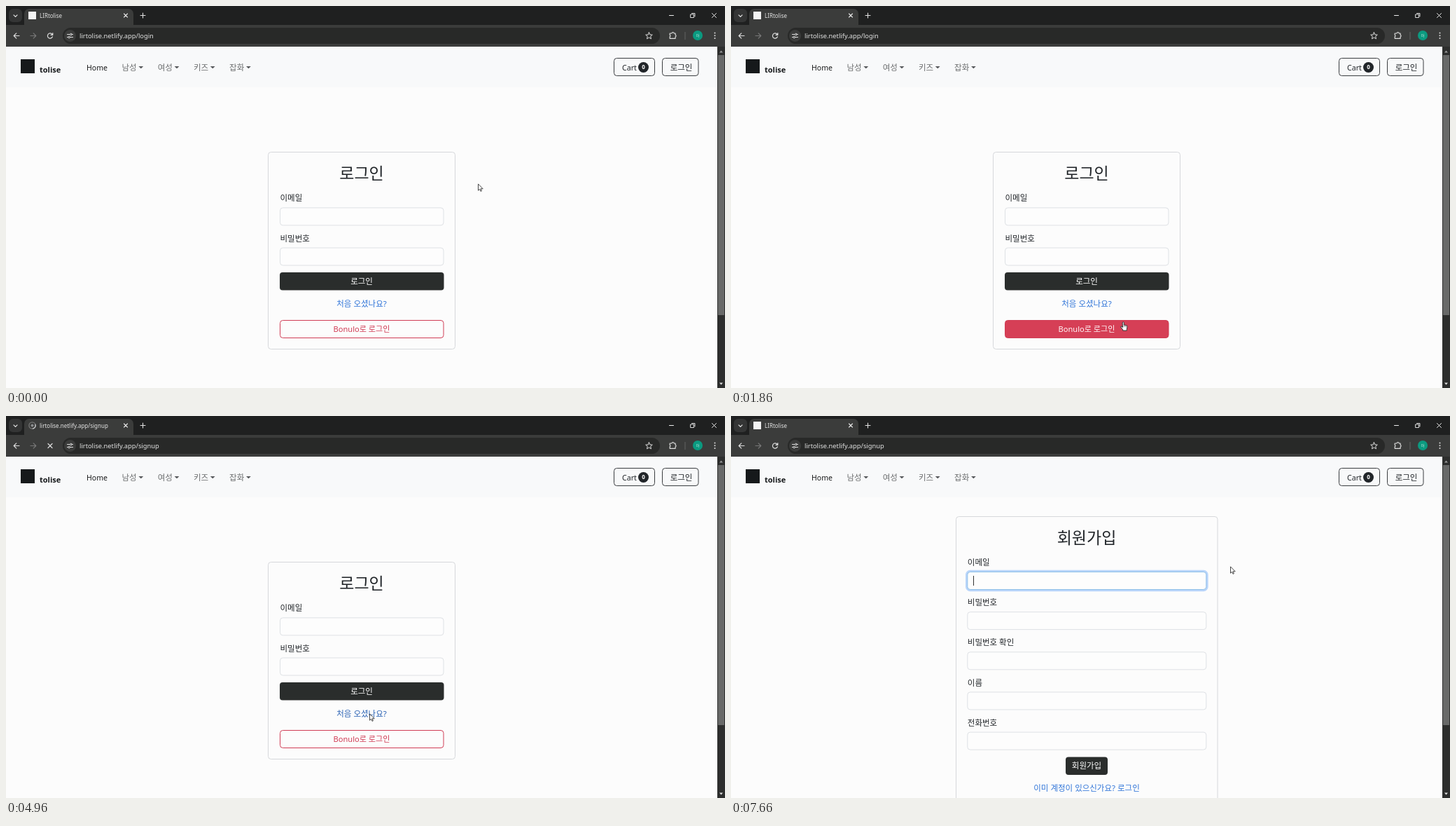
These frames come from a looping animation (1027 by 545 pixels, 8000 ms). An HTML page with a canvas:

```html
<!DOCTYPE html>
<html lang="ko">
<head>
<meta charset="utf-8">
<style>
html, body { margin: 0; width: 100%; height: 100%; overflow: hidden; background: #fcfcfc; }
canvas { display: block; }
</style>
</head>
<body>
<canvas id="stage" width="1027" height="545"></canvas>
<script>
const ctx = document.getElementById('stage').getContext('2d');
const LOOP = 8000;
const INK = '#212529', LINE = '#dee1e5', LINK = '#2f74d8', LINK_HOVER = '#2a62b4', RED = '#d03d55', PAGE = '#fcfcfc';
const FAMILY = '"Noto Sans", "Noto Sans CJK KR", "Noto Sans CJK", sans-serif';
const SITE = 'LIRtolise', HOST = 'lirtolise.netlify.app';

// Pointer stops: time, x, y (hot spot)
const POINTER = [
  [0, 674, 254], [1290, 674, 254], [1365, 612, 449], [1460, 580, 454], [1530, 572, 457],
  [1820, 572, 457], [1890, 552, 446], [2000, 528, 430], [2060, 525, 428], [2195, 525, 428],
  [2300, 521, 425], [3820, 521, 425], [3900, 519, 425],
  [5195, 519, 425], [5430, 506, 366], [5650, 506, 366], [5760, 480, 300],
  [5925, 480, 300], [5965, 470, 280], [6090, 470, 280], [6170, 450, 244],
  [6450, 450, 244], [6630, 693, 226], [6950, 693, 226], [7130, 713, 215], [LOOP, 713, 215]
];

const clamp = v => Math.max(0, Math.min(1, v));
const ramp = (t, start, span = 150) => clamp((t - start) / span);
const between = (t, a, b) => t >= a && t < b;

function pointerAt(t) {
  const i = POINTER.findIndex(p => p[0] > t);
  const a = POINTER[i - 1], b = POINTER[i], k = (t - a[0]) / (b[0] - a[0]);
  return [a[1] + (b[1] - a[1]) * k, a[2] + (b[2] - a[2]) * k];
}

function box(x, y, w, h, r, fill, stroke, width = 1) {
  ctx.beginPath();
  ctx.roundRect(x, y, w, h, r);
  if (fill) { ctx.fillStyle = fill; ctx.fill(); }
  if (stroke) { ctx.strokeStyle = stroke; ctx.lineWidth = width; ctx.stroke(); }
}

function disc(x, y, r, fill) {
  ctx.beginPath();
  ctx.arc(x, y, r, 0, 7);
  ctx.fillStyle = fill;
  ctx.fill();
}

// y is the optical middle of the line
function text(str, x, y, size, color, align = 'left', weight = 400) {
  ctx.font = `${weight} ${size}px ${FAMILY}`;
  ctx.textAlign = align;
  ctx.fillStyle = color;
  ctx.fillText(str, x, y + size * 0.37);
}

function path(d, x, y, stroke, width = 1, fill) {
  const p = new Path2D(d);
  ctx.save();
  ctx.translate(x, y);
  ctx.lineJoin = ctx.lineCap = 'round';
  if (fill) { ctx.fillStyle = fill; ctx.fill(p); }
  if (stroke) { ctx.strokeStyle = stroke; ctx.lineWidth = width; ctx.stroke(p); }
  ctx.restore();
}

const CROSS = 'M-2.5-2.5L2.5 2.5M2.5-2.5L-2.5 2.5';

function drawTabs(t, loading) {
  box(0, 0, 1027, 28, 0, '#1f2020');
  box(4, 4, 19, 19, 6, '#343535');
  path('M-2.5-1.2L0 1.3L2.5-1.2', 13.5, 14, '#e6e6e6', 1.2);
  box(26, 4, 156, 30, 7, '#3b3c3b');
  if (between(t, 4360, 5200)) {
    const turn = t / 160;
    ctx.lineWidth = 1.3;
    ctx.strokeStyle = '#777';
    ctx.beginPath(); ctx.arc(37.5, 13.5, 4.6, 0, 7); ctx.stroke();
    ctx.strokeStyle = '#c4c6c8';
    ctx.beginPath(); ctx.arc(37.5, 13.5, 4.6, turn, turn + 1.9); ctx.stroke();
    disc(37.5, 13.5, 2, '#8b8d8f');
  } else {
    box(32, 8, 11, 11, 0, '#f4f4f4');
  }
  text(loading ? HOST + '/signup' : SITE, 48, 14.5, 8, '#e4e4e4');
  path(CROSS, 171, 13.5, '#e6e6e6', 1.1);
  path('M-3.5 0H3.5M0-3.5V3.5', 195.5, 13.5, '#e0e0e0', 1.1);
  path('M-3 0H3', 950.5, 13.5, '#eee', 1);
  path('M-3-1.5H1.5V3H-3ZM-1.5-3H3V1.5', 981, 13.5, '#eee', 0.9);
  path('M-3-3L3 3M3-3L-3 3', 1011.5, 13.5, '#eee', 1);
}

function drawToolbar(t, loading) {
  box(0, 27, 1027, 31, 0, '#3b3c3b');
  path('M4 0H-3.5M-.2-3.6L-3.8 0L-.2 3.6', 15, 42.5, '#dcdcdc', 1.2);
  path('M-4 0H3.5M.2-3.6L3.8 0L.2 3.6', 39, 42.5, '#777', 1.2);
  if (loading) path('M-3-3L3 3M3-3L-3 3', 63, 42.5, '#dcdcdc', 1.2);
  else path('M3.4 1.2A3.6 3.6 0 1 1 2.6-2.5L3.8-1.2M3.8-4V-1.2H1', 63, 42.5, '#dcdcdc', 1.2);
  box(81, 31, 853, 23, 11.5, '#282928');
  disc(91.5, 42.5, 8.5, '#3b3c3b');
  path('M-4-2H-.5M3-2H4M-4 2H-3M.5 2H4', 91.5, 42.5, '#e0e0e0', 1.1);
  path('M2.7-2A1.3 1.3 0 1 1 .1-2A1.3 1.3 0 1 1 2.7-2M0 2A1.3 1.3 0 1 1-2.6 2A1.3 1.3 0 1 1 0 2', 91.5, 42.5, '#e0e0e0', 1);
  text(HOST + (t < 4360 ? '/login' : '/signup'), 105, 42.5, 9.3, '#e4e4e4');
  path('M0-4.8L1.4-1.6L4.8-1.4L2.2.9L3 4.3L0 2.5L-3 4.3L-2.2.9L-4.8-1.4L-1.4-1.6Z', 918.5, 42.5, '#dedede', 1);
  path('M-4.3-3H-1.4A1.5 1.5 0 0 1 1.6-3H3.6V-.8A1.5 1.5 0 0 1 3.6 2V4.3H-4.3V1.8A1.5 1.5 0 0 0-4.3-.8Z', 952.5, 42, '#dedede', 1.2);
  box(969.5, 37, 1, 11, 0, '#626362');
  disc(988, 42, 7, '#0b9a80');
  text('아', 988, 42, 5, '#d8f0eb', 'center');
  for (const dy of [-3.7, 0, 3.7]) disc(1012.5, 42.3 + dy, 1, '#dedede');
}

function drawScrollbar() {
  box(1016, 58, 11, 487, 0, '#2d2e2d');
  box(1017, 70, 9, 371, 0, '#686968');
  path('M-2.5 1.5L0-1.5L2.5 1.5Z', 1021.5, 65, null, 0, '#9a9a9a');
  path('M-2.5-1.5L0 1.5L2.5-1.5Z', 1021.5, 539, null, 0, '#e0e0e0');
}

function drawNav() {
  box(0, 58, 1016, 58, 0, '#f8f9fa');
  box(21, 76, 20, 20, 0, '#16191b');
  text('tolise', 48, 90.5, 11, '#16191b', 'left', 700);
  text('Home', 115, 88, 10.5, '#1b1c1d');
  ['남성', '여성', '키즈', '잡화'].forEach((label, i) => {
    const x = 165.5 + i * 51.2;
    text(label, x, 87.5, 11.5, '#6b6d6e');
    path('M-3.4-1.6H3.4L0 1.8Z', x + 27.3, 87.5, null, 0, '#55575a');
  });
  box(868.5, 74.5, 58, 25, 4, null, '#3a3d40');
  text('Cart', 880, 88, 10.6, INK);
  disc(910.5, 87.5, 7.5, INK);
  text('0', 910.5, 87.5, 8, '#fff', 'center', 700);
  box(937.5, 74.5, 51.5, 25, 4, null, '#3a3d40');
  text('로그인', 964.5, 87.5, 11.5, INK, 'center');
}

function field(label, x, y, w, focus = 0) {
  text(label, x, y - 13.7, 11.5, INK);
  if (focus) box(x - 1.2, y - 1.2, w + 2.4, 27.4, 5, null, `rgba(120,175,250,${0.5 * focus})`, 3.2);
  box(x, y, w, 25, 4, '#fdfdfd', focus ? '#8fc0e8' : LINE);
}

function card(x, y, w, h, title) {
  box(x, y, w, h, 4, null, '#d6d8db');
  text(title, 508, y + 29.7, 23, INK, 'center');
}

function darkButton(label, x, y, w) {
  box(x, y, w, 25.5, 4, '#2a2d2c');
  text(label, 508, y + 12.5, 11.5, '#fff', 'center');
}

function drawLogin(t) {
  card(374.5, 208.5, 267, 281, '로그인');
  field('이메일', 391.5, 287.9, 233.5);
  field('비밀번호', 391.5, 345, 233.5);
  darkButton('로그인', 391, 380, 234.5);
  text('처음 오셨나요?', 508, 424.5, 11.5, t > 1980 ? LINK_HOVER : LINK, 'center');

  const hover = ramp(t, 1345) * (1 - ramp(t, 1890));
  box(391.5, 448.5, 233.5, 25, 4, `rgba(214,63,86,${hover})`, RED);
  const mix = (a, b) => Math.round(a + (b - a) * hover);
  text('Bonulo로 로그인', 508, 461, 11.1, `rgb(${mix(208, 255)},${mix(61, 245)},${mix(85, 247)})`, 'center');
}

function drawSignup(t) {
  card(321.5, 143.5, 373.5, 420, '회원가입');
  ['이메일', '비밀번호', '비밀번호 확인', '이름', '전화번호'].forEach((label, i) =>
    field(label, 337.8, 222.5 + i * 57.15, 341, i ? 0 : ramp(t, 6180)));
  darkButton('회원가입', 478, 486.5, 60);
  text('이미 계정이 있으신가요? 로그인', 508, 531, 11.5, LINK, 'center');
  if (t >= 6180 && !between(t, 6990, 7500)) box(346, 228, 1, 14, 0, '#333');
}

function drawPointer(t) {
  const [x, y] = pointerAt(t);
  const onButton = between(t, 1365, 1890), onLink = between(t, 1980, 4360);
  const onField = between(t, 6150, 6580);
  if (onButton || onLink) {
    path('M-1 .8Q0-.6 1 .8V4.5L4.2 5Q6 5.3 5.8 7L5 11V12.5H-.6V11.2L-3.5 7.5Q-3.6 6-2.2 6.5L-1 7.8Z', x, y, '#333', 1, '#fff');
    path('M1 4.5V7M2.8 5V7.2M4.4 5.3V7.4', x, y, '#555', 0.6);
  } else if (onField) {
    path('M-1.8-4.3Q-.3-4.3 0-3.6Q.3-4.3 1.8-4.3M0-3.6V3.6M-1.8 4.3Q-.3 4.3 0 3.6Q.3 4.3 1.8 4.3', x, y + .3, '#333', 0.9);
  } else {
    path('M.5.3V9.2L2.6 7.3L4 10.4L5.4 9.8L4 6.8H6.8Z', x, y, '#333', 0.9, '#fff');
  }
}

function draw(t) {
  box(0, 0, 1027, 545, 0, PAGE);
  drawNav();
  (t < 5070 ? drawLogin : drawSignup)(t);
  drawScrollbar();
  const loading = between(t, 4360, 5130);
  drawTabs(t, loading);
  drawToolbar(t, loading);
  drawPointer(t);
}

function tick() {
  draw(performance.now() % LOOP);
  requestAnimationFrame(tick);
}
tick();
</script>
</body>
</html>
```
